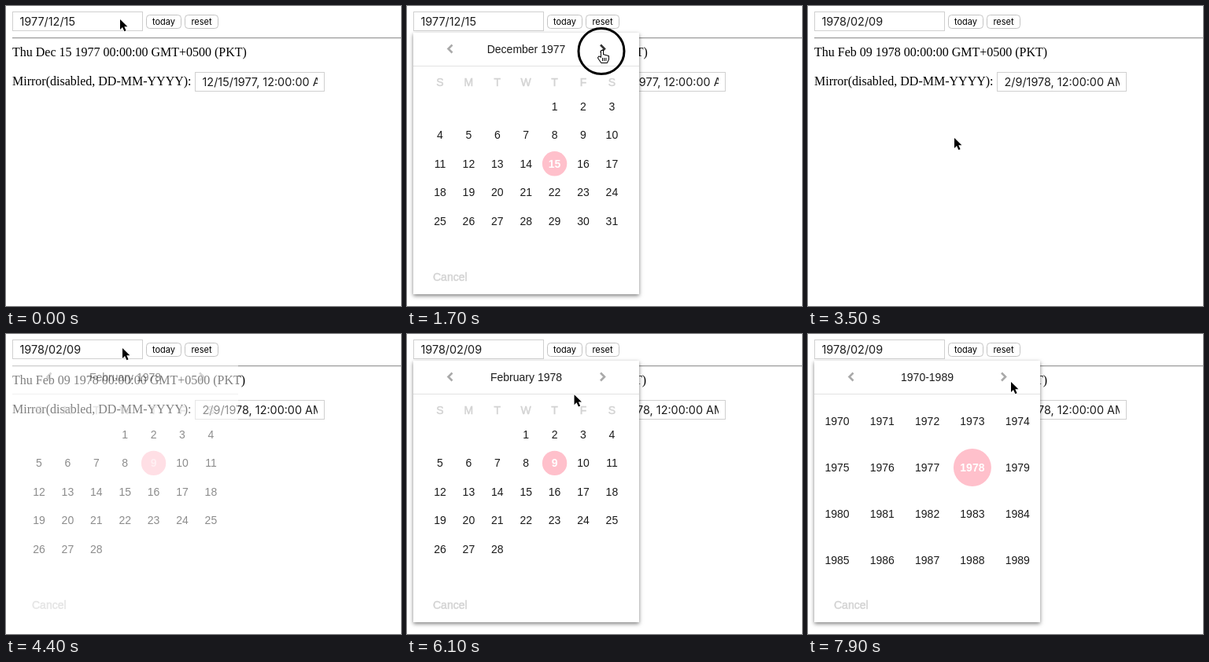
An HTML page with a canvas that plays this animation: 502x382 px, repeating every 8 s.

```html
<!DOCTYPE html>
<html lang="en">
<head>
<meta charset="utf-8">
<title>Date picker</title>
<style>
html, body { margin: 0; width: 100%; height: 100%; overflow: hidden; background: #fff; }
canvas { display: block; width: 502px; height: 382px; }
</style>
</head>
<body>
<canvas id="stage" width="502" height="382"></canvas>
<script>
const ctx = document.getElementById('stage').getContext('2d');
const LOOP = 8000, STEP = 100;
const SANS = '14px "Liberation Sans", Arial, sans-serif';
const SERIF = '16px "Liberation Serif", Times, serif';
const UI = 'Inter, sans-serif';
const PINK = '#ffc0cb', PALE = '#d3d3d3', INK = '#1c1c1c';

// Pointer moves, each eased from the previous resting place
const home = { x: 145, y: 16 };
const moves = [
  { from: 800, to: 1600, x: 248, y: 56 },
  { from: 2580, to: 3100, x: 186, y: 167 },
  { from: 3700, to: 4100, x: 148, y: 17 },
  { from: 4500, to: 5100, x: 183, y: 61 },
  { from: 5800, to: 6700, x: 297, y: 120 },
  { from: 6700, to: 7000, x: 185, y: 52 },
  { from: 7500, to: 7900, x: 258, y: 60 }
];
const clicks = [200, 1700, 2300, 3200, 4300, 5200, 7100];

const clamp = u => Math.min(1, Math.max(0, u));
const ease = u => u * u * (3 - 2 * u);
const overArrow = t => t >= 1500 && t < 2500;

function pointerAt(t) {
  let { x, y } = home;
  for (const m of moves) {
    const u = ease(clamp((t - m.from) / (m.to - m.from)));
    x += (m.x - x) * u;
    y += (m.y - y) * u;
  }
  return [x, y];
}

// Opens at `on`, closes at `off`, with a short fade both ways
const fade = (t, on, off) => clamp((t - on) / 200) * clamp((off - t) / 200);
const popupAlpha = t => fade(t, 200, 3400) + fade(t, 4300, Infinity);

function text(str, x, y, font, color = '#000', align = 'left') {
  ctx.font = font;
  ctx.fillStyle = color;
  ctx.textAlign = align;
  ctx.fillText(str, x, y);
}

function heavy(str, x, y, color, align) {
  text(str, x, y, SANS, color, align);
  ctx.strokeStyle = color;
  ctx.lineWidth = 0.5;
  ctx.strokeText(str, x, y);
}

function disc(x, y, r) {
  ctx.fillStyle = PINK;
  ctx.beginPath();
  ctx.arc(x, y, r, 0, Math.PI * 2);
  ctx.fill();
}

function field(x, y, w, value) {
  ctx.save();
  ctx.strokeStyle = '#d0d0d0';
  ctx.lineWidth = 1;
  ctx.strokeRect(x + 0.5, y + 0.5, w - 1, 24);
  ctx.beginPath();
  ctx.rect(x + 9, y, w - 18, 25);
  ctx.clip();
  text(value, x + 9.5, y + 18, '14.4px ' + UI, INK);
  ctx.restore();
}

function button(x, w, label) {
  ctx.fillStyle = '#fff';
  ctx.strokeStyle = '#c4c4c4';
  ctx.lineWidth = 1;
  ctx.beginPath();
  ctx.roundRect(x + 0.5, 11.5, w - 1, 17, 4);
  ctx.fill();
  ctx.stroke();
  text(label, x + w / 2, 24, '11px ' + UI, '#000', 'center');
}

function page(picked) {
  ctx.fillStyle = '#fff';
  ctx.fillRect(0, 0, 502, 382);
  field(8, 7, 166, picked ? '1978/02/09' : '1977/12/15');
  button(178, 45, 'today');
  button(227, 43, 'reset');
  ctx.fillStyle = '#999';
  ctx.fillRect(8, 40, 494, 1);
  ctx.fillStyle = '#e8e8e8';
  ctx.fillRect(8, 41, 494, 1);
  const day = picked ? 'Feb 09 1978' : 'Dec 15 1977';
  text(`Thu ${day} 00:00:00 GMT+0500 (PKT)`, 8, 64, SERIF);
  text('Mirror(disabled, DD-MM-YYYY):', 8, 101, SERIF);
  field(240, 84, 165, (picked ? '2/9/1978' : '12/15/1977') + ', 12:00:00 AM');
}

function chevron(x, dir, color) {
  ctx.strokeStyle = color;
  ctx.lineWidth = 2.6;
  ctx.beginPath();
  ctx.moveTo(x - 2.5 * dir, 49.5);
  ctx.lineTo(x + 2.5 * dir, 54.5);
  ctx.lineTo(x - 2.5 * dir, 59.5);
  ctx.stroke();
}

function cell(label, x, y, r, on) {
  if (on) disc(x, y, r);
  text(label, x, y + 5, (on ? 'bold ' : '') + SANS, on ? '#fff' : INK, 'center');
}

function monthView(month, selected) {
  const pitch = 36.4, colX = c => 42 + c * pitch;
  const first = new Date(1977, month, 1).getDay();
  const count = new Date(1977, month + 1, 0).getDate();
  [...'SMTWTFS'].forEach((d, c) => heavy(d, colX(c), 102, PALE, 'center'));
  for (let d = 1; d <= count; d++) {
    const i = first + d - 1;
    cell(d, colX(i % 7), 128 + Math.floor(i / 7) * pitch, 15.7, d === selected);
  }
}

function yearView() {
  for (let i = 0; i < 20; i++) {
    cell(1970 + i, 37 + (i % 5) * 57.3, 111 + Math.floor(i / 5) * 59, 24, i === 8);
  }
}

function popup(t) {
  const alpha = popupAlpha(t);
  if (!alpha) return;
  const years = t >= 7200;
  const month = t < 1800 ? 11 : t < 2400 ? 12 : 13;
  const selected = month === 11 ? 15 : t >= 3200 ? 9 : 0;
  const title = years ? '1970-1989'
    : ['December 1977', 'January 1978', 'February 1978'][month - 11];
  ctx.save();
  ctx.globalAlpha = alpha;
  ctx.save();
  if (alpha === 1) {
    ctx.shadowColor = 'rgba(0,0,0,0.5)';
    ctx.shadowBlur = 5;
    ctx.shadowOffsetY = 2;
  }
  ctx.fillStyle = '#fff';
  ctx.fillRect(8, 34, 287, 333);
  ctx.restore();
  ctx.fillStyle = '#e2e2e2';
  ctx.fillRect(8, 76, 287, 1);
  chevron(55, -1, '#aaa');
  chevron(248.5, 1, t >= 1500 && t < 2800 ? '#333' : '#aaa');
  text(title, 151.5, 60, SANS, INK, 'center');
  if (years) yearView();
  else monthView(month, selected);
  heavy('Cancel', 33, 350, PALE);
  ctx.restore();
}

function outlined(shape, fill, edge) {
  ctx.lineJoin = 'round';
  ctx.lineWidth = 2;
  ctx.strokeStyle = edge;
  ctx.fillStyle = fill;
  ctx.stroke(shape);
  ctx.fill(shape);
  ctx.lineJoin = 'miter';
}

const arrow = new Path2D('M0 1V14L3 11L5.4 16.2L7.6 15.2L5.3 10.2H9.4Z');
const hand = new Path2D('M-1 1H1V6L8 8V12L6 16H-1L-5 10L-4 8.5L-1 10Z');

function pointer(t) {
  const [x, y] = pointerAt(t);
  ctx.save();
  ctx.translate(x, y);
  if (overArrow(t)) {
    outlined(hand, '#fff', '#000');
    ctx.fillStyle = '#000';
    for (let i = 0; i < 3; i++) ctx.fillRect(i * 2.2, 10, 1, 4);
  } else {
    outlined(arrow, '#000', '#fff');
  }
  if (clicks.includes(t)) {
    ctx.strokeStyle = '#000';
    ctx.lineWidth = 3;
    ctx.beginPath();
    ctx.arc(-1, 1.5, overArrow(t) ? 29 : 20, 0, Math.PI * 2);
    ctx.stroke();
  }
  ctx.restore();
}

function draw(now) {
  const t = Math.floor((now % LOOP) / STEP) * STEP;
  page(t >= 3300);
  popup(t);
  pointer(t);
}

const start = performance.now();
function tick() {
  draw(performance.now() - start);
  requestAnimationFrame(tick);
}
tick();
</script>
</body>
</html>
```
